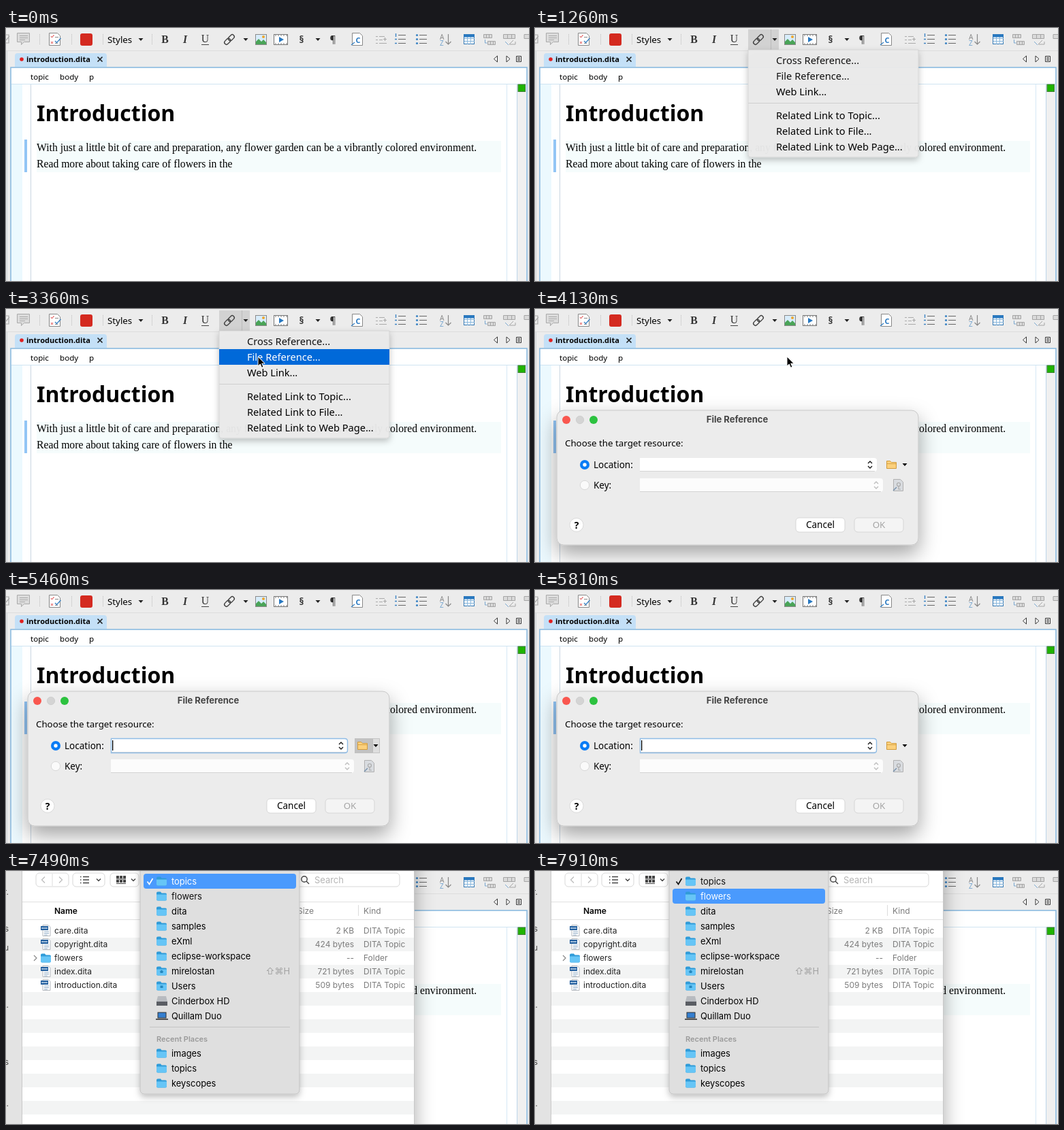
An HTML page for the animation above (8000 ms loop, 768 by 372 pixels).

```html
<!DOCTYPE html>
<html lang="en">
<head>
<meta charset="utf-8">
<title>Inserting a file reference</title>
<style>
html, body { margin: 0; width: 100%; height: 100%; overflow: hidden; background: #ececec }
svg { display: block; width: 768px; height: 372px }
text { font-family: "Noto Sans", sans-serif; font-size: 13.3px; white-space: pre }
.sf, .sf text { font-family: Inter, sans-serif; font-size: 12px }
.sf .item { font-size: 12.9px }
.serif { font-family: "Liberation Serif", serif; font-size: 15.7px }
.menu text { font-size: 14.6px }
.small { font-size: 11.6px }
.b { font-weight: 700 }
.mid { text-anchor: middle }
.end { text-anchor: end }
.dim { fill: #7b7b7b }
.line { fill: none; stroke: #444; stroke-width: 1.4 }
.gray { fill: none; stroke: #aaa; stroke-width: 1.2 }
.blue { fill: none; stroke: #3c84c4; stroke-width: 1.4 }
</style>
</head>
<body>
<svg viewBox="0 0 768 372">
<defs>
  <filter id="shade" x="-20%" y="-30%" width="140%" height="170%">
    <feDropShadow dx="0" dy="13" stdDeviation="15" flood-opacity=".36"/>
  </filter>
  <filter id="soft" x="-10%" y="-10%" width="120%" height="125%">
    <feDropShadow dx="0" dy="4" stdDeviation="5" flood-opacity=".25"/>
  </filter>
  <path id="cursor" d="M1 1v14l3.300-3 2.300 5.300 2.400-1-2.300-5.100h4.500z" stroke="#fff"/>
  <path id="down" d="M-3.500-2h7l-3.500 4z"/>
  <g id="folder">
    <path d="M0 2q0-2 2-2h4l1.500 2H13q2 0 2 2v7q0 2-2 2H2q-2 0-2-2z" fill="#2f9bd8"/>
    <path d="M0 4h15v7q0 2-2 2H2q-2 0-2-2z" fill="#66c5f6"/>
  </g>
  <g id="file">
    <path d="M3 .5h8l3 3v13H3z" fill="#fff" stroke="#b5b9be"/>
    <path d="M5 10h7M5 12.500h7M5 15h5" stroke="#8fabc6"/>
    <path d="M0 2h11v6H0z" fill="#235f9e"/>
    <path d="M1.500 5h8" stroke="#d6e6f4" stroke-width="2" stroke-dasharray="1.500 .7"/>
  </g>
  <path id="steps" d="M-3-2l3-3 3 3M-3 2l3 3 3-3" fill="none" stroke-width="1.500"/>
  <path id="rows" d="M6 2.500h11M6 8.500h11M6 14.500h11" fill="none" stroke="#666"/>
</defs>

<!-- editor window -->
<rect width="768" height="372" fill="#ececec"/>
<path d="M0 33.500h768" stroke="#dcdcdc"/>
<path d="M1.500 34v338" stroke="#d0d4d8"/>
<path d="M13 57V41q0-4 4-4h127q4 0 4 4v16z" fill="#c4e0f7"/>
<circle cx="23" cy="46" r="2.800" fill="#e02020"/>
<text class="b" x="30" y="50" style="font-size:11px">introduction.dita</text>
<path d="M134.500 42.500l7 7m0-7l-7 7" stroke="#222" stroke-width="1.700"/>
<path d="M721.500 41v9l-5-4.500zM735 41v9l5-4.500z" fill="#fff" stroke="#333"/>
<path d="M749.500 41.500h7v8h-7zM751 43.500h4M751 45.500h4M751 47.500h4" fill="#fff" stroke="#333"/>
<rect x="7" y="58" width="758" height="320" fill="#fff" stroke="#8bbbe0" stroke-width="1.600"/>
<text class="small" x="36" y="76">topic</text>
<text class="small" x="79" y="76">body</text>
<text class="small" x="122" y="76">p</text>
<path d="M8 82.500h756" stroke="#cfe4f2"/>
<rect x="8" y="83" width="16" height="289" fill="#ecf9fe"/>
<path d="M36.500 83v289" stroke="#c9d6e2"/>
<path d="M735.500 83v289" stroke="#d5e8f5"/>
<rect x="750" y="83" width="14" height="289" fill="#f0f0f0"/>
<path d="M750.500 83v289" stroke="#bcd6ea"/>
<rect x="752" y="83" width="10.500" height="10.500" fill="#1fb400" stroke="#3f7d36"/>
<rect x="45" y="166" width="682" height="46" fill="#f5fcfc"/>
<rect x="27" y="164" width="4" height="48" fill="#92c5f5"/>
<text class="b" x="45" y="137" style="font-size:32px">Introduction</text>
<text class="serif" x="45" y="181">With just a little bit of care and preparation, any flower garden can be a vibrantly colored environment.</text>
<text class="serif" x="45" y="205">Read more about taking care of flowers in the</text>

<!-- toolbar -->
<rect data-on="490,560,770,840" x="363" y="2" width="26" height="30" fill="#d6d6d6"/>
<g data-on="560,770,840,3990">
  <rect x="313" y="2" width="45" height="30" fill="#d2d2d2"/>
  <path d="M346.500 2v30" stroke="#bbb"/>
</g>
<path d="M142.500 9v16M214.500 9v16M49.500 9v16M96.500 9v16" stroke="#bbb" stroke-dasharray="1 1"/>
<path d="M0 10h4v12H0M0 18l5-6" class="gray"/>
<path d="M16.500 7.500h18v13h-8l-4 4v-4h-6z" fill="#dcdcdc" stroke="#aaa"/>
<path d="M20 11.500h12M20 14.500h12M20 17.500h8" stroke="#aaa"/>
<path d="M63.500 7.500h12l4 4v14h-16z" fill="#fff" stroke="#888"/>
<path d="M66 12l1.500 2 3-4M66 20l3 3m0-3l-3 3" fill="none" stroke="#d33"/>
<path d="M72 13.500h5M72 22.500h4" stroke="#888"/>
<path d="M72 19l2.500 2.500 6-6.500" class="blue"/>
<rect x="109" y="8" width="18" height="18" rx="3" fill="#d42a20"/>
<text x="149" y="22">Styles</text>
<g fill="#222">
  <use href="#down" x="198" y="17"/><use href="#down" x="352" y="17"/><use href="#down" x="458" y="17"/>
</g>
<g class="mid" fill="#333">
  <text class="serif b" x="233.500" y="22">B</text>
  <text class="serif b" x="263" y="22" style="font-style:italic">I</text>
  <text class="serif" x="292.500" y="21">U</text>
  <text class="b" x="434" y="22" style="font-size:14px">§</text>
  <text x="480" y="22" style="font-size:14px">¶</text>
</g>
<path d="M287 24.500h11" class="line" style="stroke-width:1"/>
<g class="line" transform="translate(328 17) rotate(-45)">
  <rect x="-9" y="-3" width="10" height="6" rx="3"/><rect x="-1" y="-3" width="10" height="6" rx="3"/>
</g>
<rect x="366.500" y="9.500" width="16" height="15" fill="#d8edfb" stroke="#8a8a8a"/>
<path d="M367 24v-4l4-4 4 4 3-3 4 4v3z" fill="#4aa458"/><circle cx="378" cy="13" r="2" fill="#efa52c"/>
<rect x="393.500" y="9.500" width="20" height="15" fill="#fff" stroke="#777"/>
<path d="M395 11h18M395 23h18" stroke="#777" stroke-dasharray="2 2"/>
<path d="M401 13v8l7-4z" fill="#2878c0"/>
<path d="M508.500 7.500h11l4 4v14h-15z" fill="#fff" stroke="#888"/>
<text class="b mid" x="517" y="22" style="font-size:11px" fill="#2878c0">C</text>
<path d="M507 25l5-4" class="blue"/>
<path d="M548 12.500h8M548 17.500h5M548 22.500h11M543 12.500h3M543 17.500h3M543 22.500h3M554 16.500h5M556.500 14v5" class="gray"/>
<use href="#rows" x="570" y="8"/><use href="#rows" x="601" y="8"/>
<path d="M572.500 8v5M571 16.500h3M571 22.500h3" class="blue"/>
<g fill="#3c84c4"><circle cx="603.500" cy="10.500" r="1.600"/><circle cx="603.500" cy="16.500" r="1.600"/><circle cx="603.500" cy="22.500" r="1.600"/></g>
<text x="637" y="17" style="font-size:10px" fill="#8a8a8a">A</text>
<text x="637" y="26" style="font-size:10px" fill="#79a7d0">Z</text>
<path d="M649.500 9v15M645.500 20l4 4 4-4" class="gray" style="stroke:#888"/>
<rect x="672.500" y="9.500" width="15" height="14" fill="#fff" stroke="#3579b5"/>
<path d="M673 15.500h15M673 19.500h15M677.500 13v11M682.500 13v11" stroke="#89b7dc"/>
<path d="M672 11.500h16" stroke="#2878c0" stroke-width="4"/>
<g fill="#dadada" stroke="#a5a5a5">
  <path d="M701.500 9.500h12v5h-12zM705.500 10v5M709.500 10v5M707.500 19.500h11v5h-11zM711.500 20v5M715.500 20v5"/>
  <path d="M730.500 9.500h17v6h-17zM736.500 10v5M742.500 10v5M768 9.500h-7v6h7"/>
  <path d="M739 24l6-6M748 20v4h-9" fill="none"/>
</g>
<path d="M703.500 17v5h3M733 20l5 5" fill="none" stroke="#79a7d0"/>

<!-- link menu -->
<g class="menu" data-on="1260,3990">
  <path d="M313 32h250v154q0 4-4 4H317q-4 0-4-4z" fill="#ebebeb" fill-opacity=".96" stroke="#c8c8c8" stroke-width=".6" filter="url(#soft)"/>
  <rect data-on="1960,2520" x="313" y="36" width="250" height="23" fill="#0069d9"/>
  <rect data-on="2520,3990" x="313" y="59" width="250" height="23" fill="#0069d9"/>
  <path d="M313 110.500h250" stroke="#cfcfcf"/>
  <g id="links"></g>
</g>

<!-- file reference dialog -->
<g data-on="4060,5880">
  <rect x="32" y="149" width="531" height="198" rx="10" fill="#ececec" stroke="#bcbcbc" stroke-width=".8" filter="url(#shade)"/>
  <circle cx="46" cy="163" r="6" fill="#f9574f"/>
  <circle cx="66" cy="163" r="5.700" fill="#d4d4d4" stroke="#c4c4c4" stroke-width=".6"/>
  <circle cx="86" cy="163" r="6" fill="#2cc23f"/>
  <text class="sf mid" x="297" y="167" style="font-size:13px;font-weight:700" fill="#444">File Reference</text>
  <text x="44" y="202">Choose the target resource:</text>
  <circle cx="73" cy="229" r="7" fill="#0a7cf5"/><circle cx="73" cy="229" r="2.700" fill="#fff"/>
  <circle cx="73" cy="259" r="6.700" fill="#fafafa" stroke="#d8d8d8"/>
  <text x="86" y="234" style="font-size:13.500px">Location:</text>
  <text x="86" y="264" style="font-size:13.500px">Key:</text>
  <path d="M154 219h344q4 0 4 4v12q0 4-4 4H154z" fill="#fff"/>
  <path d="M154 249h353q4 0 4 4v12q0 4-4 4H154z" fill="#fcfcfc"/>
  <path d="M154 238.500h345M154 268.500h354" stroke="#d4d4d4"/>
  <path data-on="4200,5880" d="M154.500 218.500h343q4 0 4 4v13q0 4-4 4h-343z" fill="none" stroke="#8fbce6" stroke-width="1.400"/>
  <rect data-on="4200,4760,5320,5880" x="156" y="221" width="1.300" height="15"/>
  <use href="#steps" x="492" y="229" stroke="#222"/><use href="#steps" x="501" y="259" stroke="#c0c0c0"/>
  <g data-on="5040,5810">
    <rect x="512.500" y="218.500" width="36" height="21" fill="#dedede" stroke="#c4c4c4"/>
    <rect data-on="5460,5810" x="512" y="218" width="26" height="22" fill="#c2c2c2"/>
    <path d="M538.500 219v20" stroke="#bbb"/>
  </g>
  <path d="M516.500 234.500v-11h5l2 2h7v9z" fill="#fbd07c" stroke="#d09a3c"/>
  <path d="M517 227.500h13" stroke="#d9a445"/>
  <use href="#down" x="543" y="229"/>
  <path d="M526.500 250.500h10l4 4v13h-14z" fill="#d9dce0" stroke="#b0b0b0"/>
  <path d="M526 267l5-5" stroke="#7892ac" stroke-width="1.500"/>
  <circle cx="534" cy="258" r="2.500" class="gray"/><path d="M534 260v5h3" class="gray"/>
  <circle cx="61" cy="317.500" r="10" fill="#fff" stroke="#d2d2d2" stroke-width=".8"/>
  <text class="mid" x="61" y="322.500" style="font-size:14px;font-weight:600">?</text>
  <g stroke="#d0d0d0" stroke-width=".8">
    <rect x="383" y="307" width="72" height="21" rx="5" fill="#fff"/>
    <rect x="469" y="307" width="72" height="21" rx="5" fill="#f4f4f4"/>
  </g>
  <text class="mid" x="419" y="322" style="font-size:13.500px">Cancel</text>
  <text class="mid" x="505" y="322" fill="#a5a5a5">OK</text>
</g>

<!-- file chooser -->
<g class="sf" data-on="5880,8000">
  <rect x="-40" y="-40" width="639" height="480" fill="#fff" filter="url(#shade)"/>
  <rect width="24" height="372" fill="#e3e3e3"/>
  <path d="M23.500 0v372M599.500 0v372" stroke="#c9c9c9"/>
  <g id="edge" class="end" fill="#444"></g>
  <g fill="#fff" stroke="#d8d8d8">
    <rect x="44" y="3" width="48" height="20" rx="5"/><rect x="98" y="3" width="47" height="20" rx="5"/>
    <rect x="153" y="3" width="42" height="20" rx="5"/><rect x="208" y="3" width="207" height="20" rx="5"/>
    <rect x="426" y="3" width="152" height="20" rx="5"/>
  </g>
  <path d="M68 4v18" stroke="#ddd"/>
  <path d="M57 8.500l-4.500 4.500 4.500 4.500M78 8.500l4.500 4.500-4.500 4.500" class="gray" style="stroke:#bbb"/>
  <path d="M113 8.500h9M113 13h9M113 17.500h9M109 8.500h1.500M109 13h1.500M109 17.500h1.500M133 11.500l3 3 3-3M184 11.500l3 3 3-3" class="line"/>
  <path d="M162 9h14M162 15h14" stroke="#444" stroke-width="4" stroke-dasharray="4 1"/>
  <path d="M162 18.500h14M162 12h14" stroke="#444"/>
  <use href="#folder" x="216" y="6.500"/><text class="item" x="237" y="17">topics</text>
  <rect x="397" y="5" width="16" height="16" rx="4" fill="#1b7cf2"/><use href="#steps" x="405" y="13" stroke="#fff"/>
  <g class="line"><circle cx="438" cy="12" r="4.200"/><path d="M441 15l4 4"/></g>
  <text class="item" x="453" y="18" fill="#b5b5b5">Search</text>
  <path d="M24 45.500h575M24 71.500h575" stroke="#e1e1e1"/>
  <path d="M241.500 50v16M420.500 50v16M517.500 50v16" stroke="#dcdcdc"/>
  <text x="71" y="62.500" style="font-weight:600">Name</text>
  <path d="M223 61l3.500-3.500 3.500 3.500" class="gray" style="stroke:#888"/>
  <g class="dim"><text x="247" y="62.500">Date Modified</text><text x="428" y="62.500">Size</text><text x="525" y="62.500">Kind</text></g>
  <g id="list"></g>
</g>

<!-- places popup -->
<g class="sf" data-on="7490,8000">
  <rect x="197" y="-12" width="234" height="340" rx="6" fill="#dfdfdf" stroke="#b9b9b9" stroke-width=".8" filter="url(#soft)"/>
  <rect data-on="7490,7910" x="202" y="4" width="224" height="22" rx="4" fill="#4a9afd"/>
  <rect data-on="7910,8000" x="202" y="26" width="224" height="22" rx="4" fill="#4a9afd"/>
  <path id="tick" d="M207.500 15.500l3 4 5-8.500" class="line" style="stroke-width:1.700"/>
  <path d="M211 229.500h206" stroke="#c4c4c4"/>
  <text x="221" y="251" style="font-size:11px;font-weight:600" fill="#9a9a9a">Recent Places</text>
  <text x="417" y="151.500" class="item end" fill="#a2a2a2" style="font-family:Inter,'DejaVu Sans',sans-serif">⇧⌘H</text>
  <g id="places"></g>
  <path d="M226.500 150v-2h-1l3-2.500 3 2.500h-1v2zM226.500 172v-3.500h4v3.500z" fill="#2587bd"/>
  <path d="M223 184h12l2 8v5h-16v-5z" fill="#b8bbc0"/><path d="M221 192h16v6h-16z" fill="#5a5d63"/>
  <rect x="223" y="208" width="12" height="8" fill="#347fd0" stroke="#333"/><path d="M220 218h18" stroke="#555" stroke-width="2"/>
</g>

<use href="#cursor" x="352" y="15" data-on="1610,1820"/>
<use href="#cursor" x="369" y="69" data-on="3360,4690"/>
<use href="#cursor" x="519" y="228" data-on="5950,6300"/>
</svg>
<script>
const LOOP = 8000;
const get = id => document.getElementById(id);
const text = (x, y, str, extra = '') => `<text x="${x}" y="${y}" ${extra}>${str}</text>`;
const icon = (name, x, y) => `<use href="#${name}" x="${x}" y="${y}"/>`;

const links = ['Cross Reference...', 'File Reference...', 'Web Link...',
  'Related Link to Topic...', 'Related Link to File...', 'Related Link to Web Page...'];
get('links').innerHTML = links.map((s, i) => text(354, 53 + i * 23 + (i > 2) * 12, s)).join('');

get('edge').innerHTML = [['r.', 35], ['s', 89], ['u', 117], ['t.', 201], ['s', 285], ['e..', 346]]
  .map(([s, y]) => text(4, y, s)).join('');

const files = [
  ['care.dita', 'Today at 07:45', '2 KB'],
  ['copyright.dita', 'September 26, 2022 at 10:08', '424 bytes'],
  ['flowers', 'October 21, 2022 at 09:44', '--'],
  ['index.dita', 'September 26, 2022 at 10:08', '721 bytes'],
  ['introduction.dita', 'Today at 07:50', '509 bytes']
];
let list = '';
for (let y = 98; y < 372; y += 40) list += `<rect x="24" y="${y}" width="575" height="20" fill="#f3f4f4"/>`;
files.forEach(([name, date, size], i) => {
  const y = 92 + i * 20, isFile = name.includes('.');
  list += isFile ? icon('file', 51, y - 13) : icon('folder', 51, y - 10.5) +
    `<path d="M41 ${y - 8}l4 4-4 4" class="gray" style="stroke:#888"/>`;
  list += text(71, y, name, 'fill="#222"') + text(247, y, date, 'class="dim"') +
    text(511, y, size, 'class="dim end"') + text(525, y, isFile ? 'DITA Topic' : 'Folder', 'class="dim"');
});
get('list').innerHTML = list;

const places = ['topics', 'flowers', 'dita', 'samples', 'eXml', 'eclipse-workspace', 'mirelostan',
  'Users', 'Cinderbox HD', 'Quillam Duo', 'images', 'topics', 'keyscopes'];
get('places').innerHTML = places.map((name, i) => {
  const y = 15 + i * 22 + (i > 9) * 33;
  return (i == 8 || i == 9 ? '' : icon('folder', 221, y - 6.5)) + text(243, y + 4.5, name, 'class="item"');
}).join('');

const parts = [...document.querySelectorAll('[data-on]')]
  .map(el => ({ el, times: el.dataset.on.split(',').map(Number) }));
const linkTexts = get('links').children;
const placeTexts = get('places').querySelectorAll('text');
const paint = (el, on) => el.setAttribute('fill', on ? '#fff' : '#111');

function draw(now) {
  const t = now % LOOP;
  // Each pair of switch times turns a part on and off again.
  for (const { el, times } of parts)
    el.style.display = times.filter(s => s <= t).length % 2 ? '' : 'none';
  paint(linkTexts[0], t >= 1960 && t < 2520);
  paint(linkTexts[1], t >= 2520);
  paint(placeTexts[0], t < 7910);
  paint(placeTexts[1], t >= 7910);
  get('tick').style.stroke = t < 7910 ? '#fff' : '#111';
  requestAnimationFrame(draw);
}
draw(0);
</script>
</body>
</html>
```
